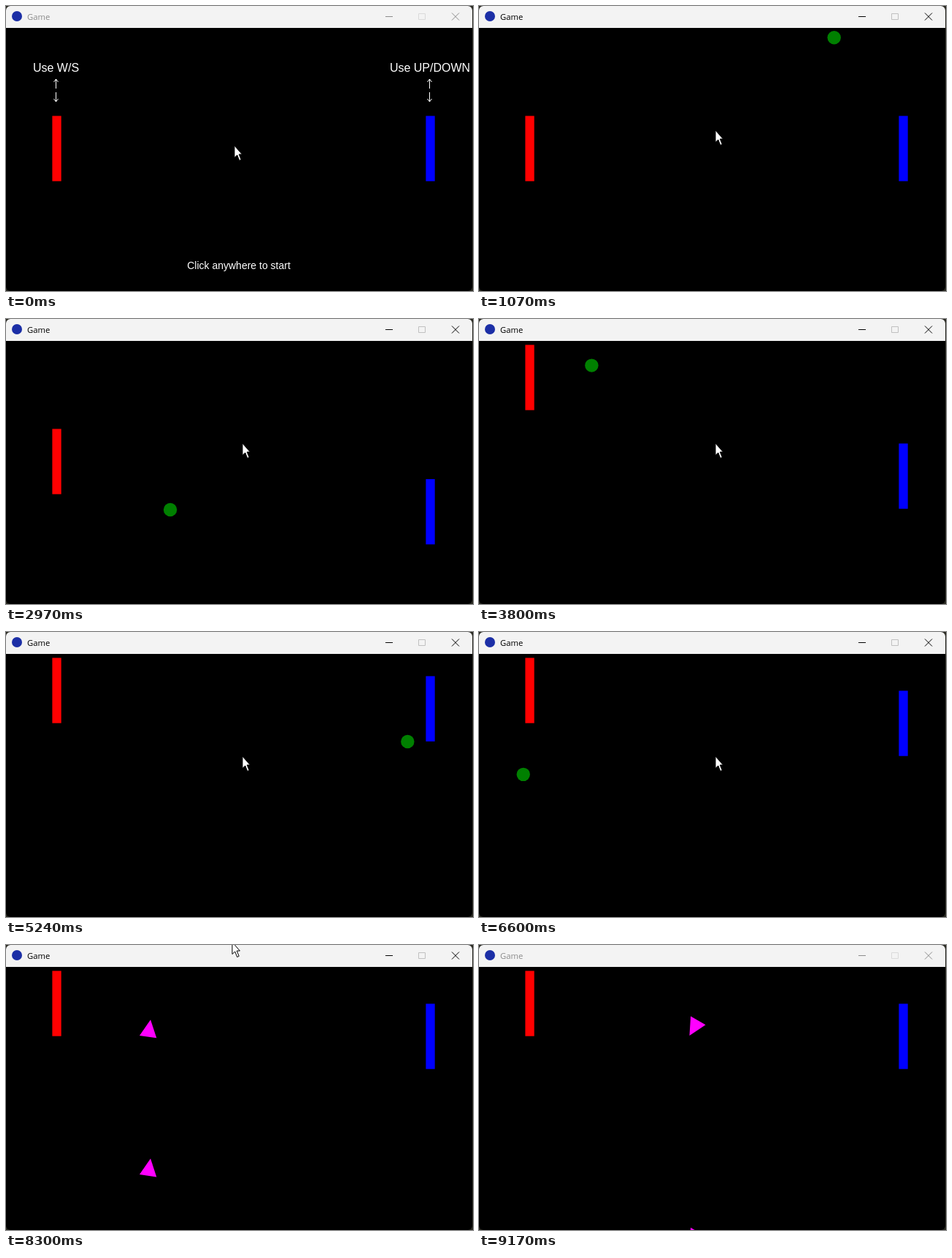
An HTML page with a canvas that plays this animation: 640 px wide and 390 px high, repeating every 9230 ms.

```html
<!DOCTYPE html>
<html lang="en">
<head>
<meta charset="utf-8">
<title>Game</title>
<style>
  html, body { margin: 0; width: 100%; height: 100%; overflow: hidden; background: #000; }
  canvas { display: block; }
</style>
</head>
<body>
<canvas id="stage" width="640" height="390"></canvas>
<script>
const LOOP = 9230, START = 145, LOST = 6760, BLUR = 9100, TICK = 1000 / 60;
const LEFT = 83, RIGHT = 570, TOP = 42, BOTTOM = 377; // limits of the ball's centre
const RISE = [3, 4.28, 6.2, 7.66];                    // vertical speed, grows with each hit
const KEY_SPEED = 0.3;                                // paddle pixels per ms
const SANS = '"Liberation Sans", Arial, sans-serif';
const g = document.getElementById('stage').getContext('2d');

// Reflects v back and forth between two walls.
function fold(v, lo, hi) {
  const span = hi - lo, m = (((v - lo) % (2 * span)) + 2 * span) % (2 * span);
  return lo + (m < span ? m : 2 * span - m);
}

function ease(t, from, to) {
  const k = Math.min(1, Math.max(0, (t - from) / (to - from)));
  return k * k * (3 - 2 * k);
}

// The ball crosses at 3 pixels per tick and gains one with each paddle hit.
function ballAt(t) {
  let ticks = (t - START) / TICK, x = 320, y = 210, dir = 1;
  RISE.forEach((rise, hits) => {
    const speed = 3 + hits;
    const gap = dir > 0 ? RIGHT - x : x - LEFT;
    const run = hits < 3 ? Math.min(ticks, gap / speed) : ticks;
    x += dir * speed * run;
    y -= rise * run;
    ticks -= run;
    dir = -dir;
  });
  return [x, fold(y, TOP, BOTTOM)];
}

// Each move is [time the key goes down, where the paddle stops].
function paddleAt(t, y, moves) {
  for (const [since, stop] of moves) {
    const step = Math.max(0, t - since) * KEY_SPEED;
    y += Math.sign(stop - y) * Math.min(step, Math.abs(stop - y));
  }
  return y;
}

function cursorAt(t) {
  const rest = ease(t, 160, 600), leave = ease(t, 6900, 7800), gone = ease(t, 8330, 8450);
  return [313 + 11 * rest - 14 * leave, 191 - 21 * rest - 174 * leave - 20 * gone];
}

function text(s, x, y, font, color, align = 'center') {
  g.font = font;
  g.fillStyle = color;
  g.textAlign = align;
  g.fillText(s, x, y);
}

function disc(x, y, r, color) {
  g.fillStyle = color;
  g.beginPath();
  g.arc(x, y, r, 0, Math.PI * 2);
  g.fill();
}

function line(d, color) {
  g.strokeStyle = color;
  g.lineWidth = 1;
  g.stroke(new Path2D(d));
}

function drawPaddle(x, y, color) {
  g.fillStyle = color;
  g.fillRect(x + 0.4, y + 0.4, 12.3, 89.3);
}

function drawHelp() {
  text('Use W/S', 68.5, 90, '16px ' + SANS, '#fff');
  text('Use UP/DOWN', 581, 90, '16px ' + SANS, '#fff');
  text('Click anywhere to start', 319, 360, '14px ' + SANS, '#fff');
  for (const x of [68.5, 580.5]) {
    line(`M${x} 113V100m-3 4l3 -4l3 4`, '#fff');
    line(`M${x} 118v13m-3 -4l3 4l3 -4`, '#fff');
  }
}

// Both shards drift right from the lost ball, spinning together.
function drawShard(t, y, fall) {
  const dt = t - 8300;
  g.save();
  g.translate(195.7 + 0.1155 * dt, y + fall * dt);
  g.rotate((8.5 - 0.182 * dt) * Math.PI / 180);
  g.fillStyle = '#f0f';
  g.fill(new Path2D('M0 -15.7L11.8 8H-11.8Z'));
  g.restore();
}

function drawBar(active) {
  g.fillStyle = '#f3f3f3';
  g.fillRect(0, 0, 640, 30);
  disc(15, 14, 7, '#1c2fa6');
  const ink = active ? '#000' : '#8c8c8c';
  text('Game', 29, 19, '11.3px "Open Sans", "Noto Sans", sans-serif', ink, 'left');
  line('M520 14.5h10', ink);
  line('M565.5 10.5h9v8h-9z', active ? '#c0c0c0' : '#dadada');
  line('M611 9.5l10 10m0 -10l-10 10', ink);
}

function drawCursor(x, y) {
  g.save();
  g.translate(x, y);
  const arrow = new Path2D('M0 0V16.5L3.8 13L6.8 20.5L9.3 19.3L6.3 12H10.5Z');
  g.fillStyle = '#fff';
  g.fill(arrow);
  g.strokeStyle = '#000';
  g.lineWidth = 1;
  g.stroke(arrow);
  g.restore();
}

function draw(now) {
  const t = now % LOOP, playing = t >= START;
  g.fillStyle = '#2a2a22';
  g.fillRect(0, 0, 640, 390);
  g.save();
  g.beginPath();
  g.roundRect(0, 0, 639, 390, 6);
  g.clip();
  g.fillStyle = '#000';
  g.fillRect(0, 0, 640, 390);
  if (!playing) drawHelp();
  drawPaddle(63, paddleAt(t, 150, [[3050, 35]]), '#f00');
  drawPaddle(575, paddleAt(t, 150,
    [[1330, 120], [2250, 240], [2900, 170], [4870, 60], [5700, 80]]), '#00f');
  if (playing) disc(...ballAt(t), 9.2, '#008000');
  if (t >= LOST) {
    drawShard(t, 117.7, -0.0085);
    drawShard(t, 307.7, 0.1055);
  }
  drawBar(playing && t < BLUR);
  drawCursor(...cursorAt(t));
  g.restore();
  requestAnimationFrame(draw);
}
requestAnimationFrame(draw);
</script>
</body>
</html>
```
